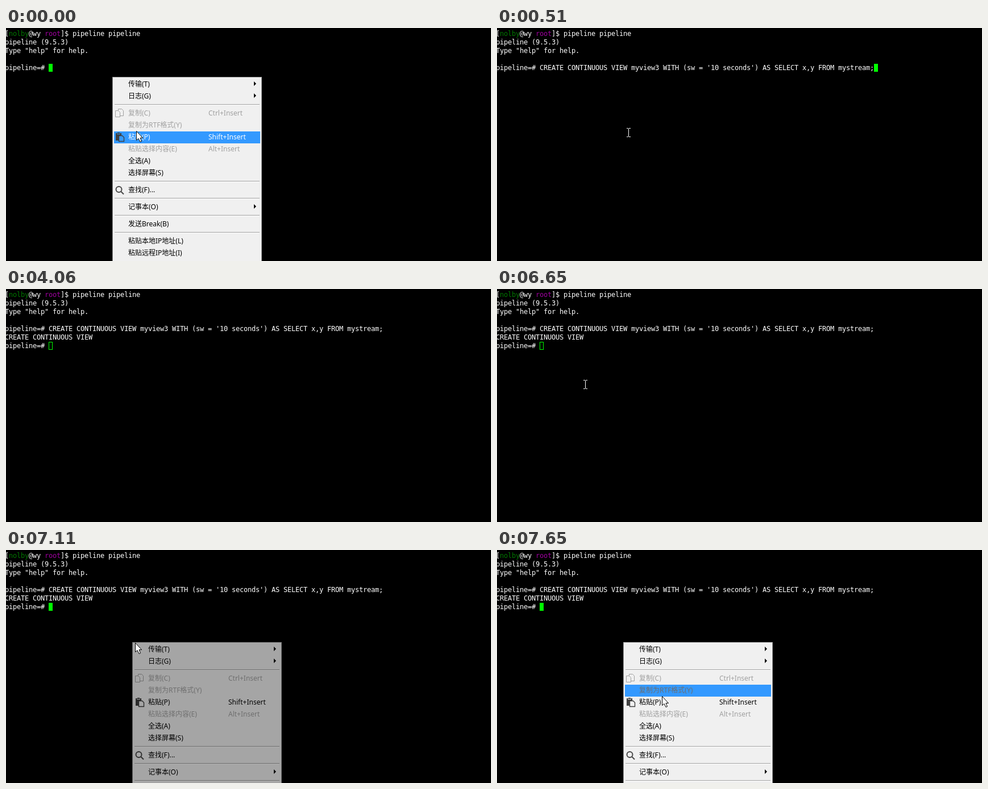
An HTML page with a canvas that plays this animation: 853 px wide and 410 px high, repeating every 8 s.

```html
<!DOCTYPE html>
<html lang="zh">
<head>
<meta charset="utf-8">
<style>
  html, body { margin: 0; width: 100%; height: 100%; overflow: hidden; background: #000; }
  canvas { display: block; }
</style>
</head>
<body>
<canvas id="stage" width="853" height="410"></canvas>
<script>
const LOOP = 8000, W = 853, H = 410;
const CELL = 7, LINE = 15, LEFT = -2, TOP = 3;
const MONO = '12px "DejaVu Sans Mono", monospace';
const UI = '12px "Noto Sans", "Noto Sans CJK SC", "Noto Sans CJK", sans-serif';
const PROMPT = 'pipeline=# ';
const QUERY = "CREATE CONTINUOUS VIEW myview3 WITH (sw = '10 seconds') AS SELECT x,y FROM mystream;";

const screen = document.getElementById('stage').getContext('2d');
const layerCanvas = Object.assign(document.createElement('canvas'), { width: W, height: H });
const layer = layerCanvas.getContext('2d');

// null marks a separator
const ITEMS = [
  { label: '传输(T)', submenu: true },
  { label: '日志(G)', submenu: true },
  null,
  { label: '复制(C)', keys: 'Ctrl+Insert', icon: copyIcon, disabled: true },
  { label: '复制为RTF格式(Y)', disabled: true },
  { label: '粘贴(P)', keys: 'Shift+Insert', icon: pasteIcon },
  { label: '粘贴选择内容(E)', keys: 'Alt+Insert', disabled: true },
  { label: '全选(A)' },
  { label: '选择屏幕(S)' },
  null,
  { label: '查找(F)...', icon: findIcon },
  null,
  { label: '记事本(O)', submenu: true },
  null,
  { label: '发送Break(B)' },
  null,
  { label: '粘贴本地IP地址(L)' },
  { label: '粘贴远程IP地址(I)' }
];
const COPY = 3, COPY_RTF = 4, PASTE = 5;

function rect(c, color, x, y, w, h) {
  c.fillStyle = color;
  c.fillRect(x, y, w, h);
}

function polygon(c, points) {
  c.beginPath();
  points.forEach(([x, y]) => c.lineTo(x, y));
  c.closePath();
}

function page(c, x, y, w, h, fill) {
  polygon(c, [[x, y], [x + w - 3, y], [x + w, y + 3], [x + w, y + h], [x, y + h]]);
  c.fillStyle = fill;
  c.fill();
  c.stroke();
}

function copyIcon(c, x, y, back) {
  c.strokeStyle = '#a0a0a0';
  c.lineWidth = 1;
  page(c, x + 5.5, y + 2.5, 9, 12, back);
  page(c, x + .5, y + 5.5, 8, 11, back);
}

function pasteIcon(c, x, y, back) {
  rect(c, '#404040', x + 1, y + 3, 10, 13);
  rect(c, '#404040', x + 4, y + 2, 4, 1);
  rect(c, back, x + 3, y + 4, 6, 1);
  c.strokeStyle = '#404040';
  c.lineWidth = 1.4;
  page(c, x + 6.5, y + 7.5, 9, 10, back);
}

function findIcon(c, x, y) {
  c.strokeStyle = '#484848';
  c.lineWidth = 2;
  c.beginPath();
  c.arc(x + 6.5, y + 9, 5, 0, 7);
  c.moveTo(x + 10, y + 12.5);
  c.lineTo(x + 15, y + 17.5);
  c.stroke();
}

function drawItem(c, item, x, y, active) {
  const back = active ? '#3399ff' : '#f0f0f0';
  if (active) rect(c, back, x + 3, y, 257, 21);
  if (item.icon) item.icon(c, x + 5, y, back);
  c.font = UI;
  c.fillStyle = item.disabled ? (active ? '#6d6d6d' : '#a0a0a0') : active ? '#fff' : '#000';
  c.fillText(item.label, x + 28, y + 14);
  if (item.keys) c.fillText(item.keys, x + 169, y + 14);
  if (item.submenu) {
    polygon(c, [[x + 249, y + 5], [x + 253, y + 9], [x + 249, y + 13]]);
    c.fill();
  }
}

// With onlyActive set, just the chosen row is drawn, as when the menu has closed.
function drawMenu({ x, y, active, alpha = 1, onlyActive = false }) {
  layer.clearRect(0, 0, W, H);
  if (!onlyActive) {
    rect(layer, '#979797', x, y, 263, H);
    rect(layer, '#f0f0f0', x + 1, y + 1, 261, H);
  }
  let rowY = y + 3;
  ITEMS.forEach((item, i) => {
    if (!onlyActive || i === active) {
      if (item) drawItem(layer, item, x, rowY, i === active);
      else {
        rect(layer, '#a0a0a0', x + 4, rowY + 3, 255, 1);
        rect(layer, '#fff', x + 4, rowY + 4, 255, 1);
      }
    }
    rowY += item ? 21 : 9;
  });
  screen.globalAlpha = alpha;
  screen.drawImage(layerCanvas, 0, 0);
  screen.globalAlpha = 1;
}

function print(text, row, col = 0, color = '#fff') {
  screen.font = MONO;
  screen.fillStyle = color;
  [...text].forEach((ch, i) => screen.fillText(ch, LEFT + (col + i) * CELL, TOP + row * LINE + 11));
}

function drawTerminal(t) {
  rect(screen, '#000', 0, 0, W, H);
  print('[', 0);
  print('nolby', 0, 1, '#007800');
  print('@wy', 0, 6);
  print('root', 0, 10, '#a000a0');
  print(']$ pipeline pipeline', 0, 14);
  print('pipeline (9.5.3)', 1);
  print('Type "help" for help.', 2);

  const pasted = t >= 120, executed = t >= 2170;
  print(PROMPT + (pasted ? QUERY : ''), 4);
  if (executed) {
    print('CREATE CONTINUOUS VIEW', 5);
    print(PROMPT, 6);
  }
  const col = PROMPT.length + (pasted && !executed ? QUERY.length : 0);
  const x = LEFT + col * CELL, y = TOP + (executed ? 6 : 4) * LINE;
  rect(screen, '#0f0', x, y, 7, 14);
  if (t >= 4060 && t < 7110) rect(screen, '#000', x + 1, y + 1, 5, 12);
}

function drawBeam(x, y) {
  for (const edge of [y, y + 15]) {
    rect(screen, '#fff', x, edge, 3, 1);
    rect(screen, '#fff', x + 4, edge, 3, 1);
  }
  rect(screen, '#fff', x + 3, y + 1, 1, 14);
}

function drawArrow(x, y) {
  polygon(screen, [[0, 0], [0, 16], [3.5, 13], [6.5, 19], [9, 18], [6.5, 12], [11, 12]]
    .map(([px, py]) => [x + px + .5, y + py + .5]));
  screen.fillStyle = '#fff';
  screen.fill();
  screen.strokeStyle = '#000';
  screen.lineWidth = 1;
  screen.stroke();
}

const first = { x: 187, y: 86, active: PASTE };
const second = { x: 222, y: 162 };

// Each scene holds from its time until the next one.
const SCENES = [
  { at: 0, menu: first, arrow: [229, 181] },
  { at: 120, beam: [228, 175], menu: { ...first, onlyActive: true, alpha: 2 / 3 } },
  { at: 240, beam: [228, 175], menu: { ...first, onlyActive: true, alpha: 1 / 3 } },
  { at: 360, beam: [228, 175] },
  { at: 510, beam: [228, 176] },
  { at: 2970 },
  { at: 6650, beam: [152, 160] },
  { at: 6800, beam: [221, 155] },
  { at: 7110, menu: { ...second, alpha: .69 }, arrow: [227, 163] },
  { at: 7260, menu: second, arrow: [232, 170] },
  { at: 7380, menu: { ...second, active: COPY }, arrow: [266, 222] },
  { at: 7530, menu: { ...second, active: COPY_RTF }, arrow: [284, 246] },
  { at: 7650, menu: { ...second, active: COPY_RTF }, arrow: [290, 257] }
];

function frame() {
  const t = performance.now() % LOOP;
  const scene = SCENES.findLast(s => s.at <= t);
  drawTerminal(t);
  if (scene.beam) drawBeam(...scene.beam);
  if (scene.menu) drawMenu(scene.menu);
  if (scene.arrow) drawArrow(...scene.arrow);
  requestAnimationFrame(frame);
}
frame();
</script>
</body>
</html>
```
